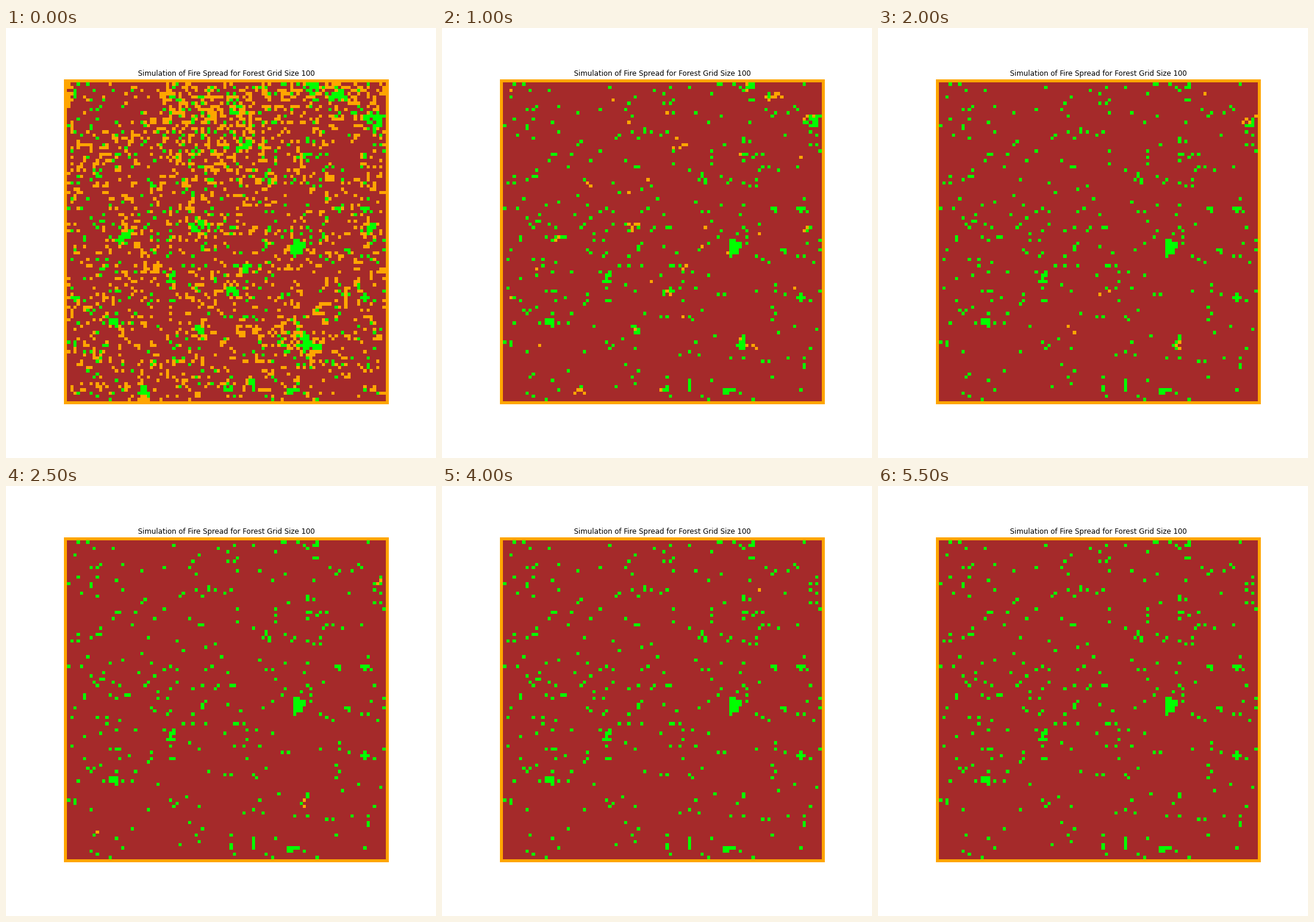
Write a matplotlib script that moves like this. It is 720 by 720 pixels and loops after 8 s.

```python
import matplotlib.pyplot as plt
import numpy as np
from matplotlib.animation import FuncAnimation
from matplotlib.colors import ListedColormap

SIZE = 100
STEPS = 16
SPREAD = .6         # chance that a burning neighbour ignites a tree
SPREAD_STEPS = 5    # the wind drops after this many steps
BARE, TREE, FIRE = range(3)

# Burning areas: column, row, spread x, spread y, density
BLAZES = [
    (46, 7, 15, 8, .4), (80, 3, 13, 4, .4), (1, 3, 3, 5, .6),
    (50, 25, 14, 8, .16), (68, 80, 3, 2, .6),
]
# Larger woods: column, row, radius
WOODS = [
    (77, 2, 2.2), (86, 4, 2.6), (97, 12, 3.2), (56, 20, 2.4), (42, 46, 2.8),
    (19, 49, 2.6), (73, 52, 2.4), (96, 46, 2), (52, 66, 2.2), (75, 82, 2.8),
]
# Step: column and row of a single lightning strike
LIGHTNING = {5: (10, 92), 6: (92, 65), 8: (81, 16), 9: (11, 44), 10: (80, 23)}

rng = np.random.default_rng(100)
row, col = np.mgrid[:SIZE + 2, :SIZE + 2]


def chance(p):
    return rng.random(row.shape) < p


def bump(x, y, sx, sy, power=2):
    return np.exp(-np.hypot((col - x) / sx, (row - y) / sy) ** power)


def plant():
    """Forest already partly burnt, with fire and trees around hot spots."""
    fire = .11 + sum(gain * bump(x, y, sx, sy)
                     for x, y, sx, sy, gain in BLAZES)
    fire *= 1 - .9 * bump(12, 9, 8, 7)
    trees = .045 + .28 * (fire - .11).clip(0)

    thickets = [(*rng.integers(3, SIZE - 2, 2), rng.uniform(1, 1.9))
                for _ in range(16)]
    for x, y, r in WOODS + thickets:
        trees = np.maximum(trees, .8 * bump(x, y, r, r, 4))
        fire = np.maximum(fire, .4 * bump(x, y, 2 * r, 2 * r))

    grid = np.where(chance(fire), FIRE, BARE)
    for axis in (0, 1):
        grown = (np.roll(grid, 1, axis) == FIRE) & chance(.1)
        grid[grown] = FIRE
    grid[chance(trees)] = TREE
    for x, y in LIGHTNING.values():
        grid[y, x] = TREE
    return grid


def burn(grid, step):
    """Trees catch fire from their four neighbours; fire burns out."""
    burning = np.pad(grid[1:-1, 1:-1] == FIRE, 1)
    caught = np.zeros_like(burning)
    if step <= SPREAD_STEPS:
        for axis in (0, 1):
            for shift in (-1, 1):
                caught |= np.roll(burning, shift, axis) & chance(SPREAD)
    after = np.where(burning, BARE, grid)
    after[caught & (grid == TREE)] = FIRE
    if step in LIGHTNING:
        x, y = LIGHTNING[step]
        after[y, x] = FIRE
    return after


def framed(grid):
    return np.pad(grid[1:-1, 1:-1], 1, constant_values=FIRE)


history = [plant()]
for step in range(1, STEPS):
    history.append(burn(history[-1], step))

fig = plt.figure(figsize=(10, 10), dpi=72, facecolor="white")
fig.subplots_adjust(left=.125, right=.9, bottom=.125, top=.88)
ax = fig.add_subplot()
ax.axis("off")
ax.set_title(f"Simulation of Fire Spread for Forest Grid Size {SIZE}",
             fontname="DejaVu Sans", fontsize=12)
image = ax.imshow(framed(history[0]), vmin=BARE, vmax=FIRE,
                  cmap=ListedColormap(["brown", "lime", "orange"]),
                  interpolation="nearest")


def update(step):
    image.set_data(framed(history[step]))
    return [image]


anim = FuncAnimation(fig, update, frames=STEPS, interval=500,
                     repeat=True, repeat_delay=0)
plt.show()
```
